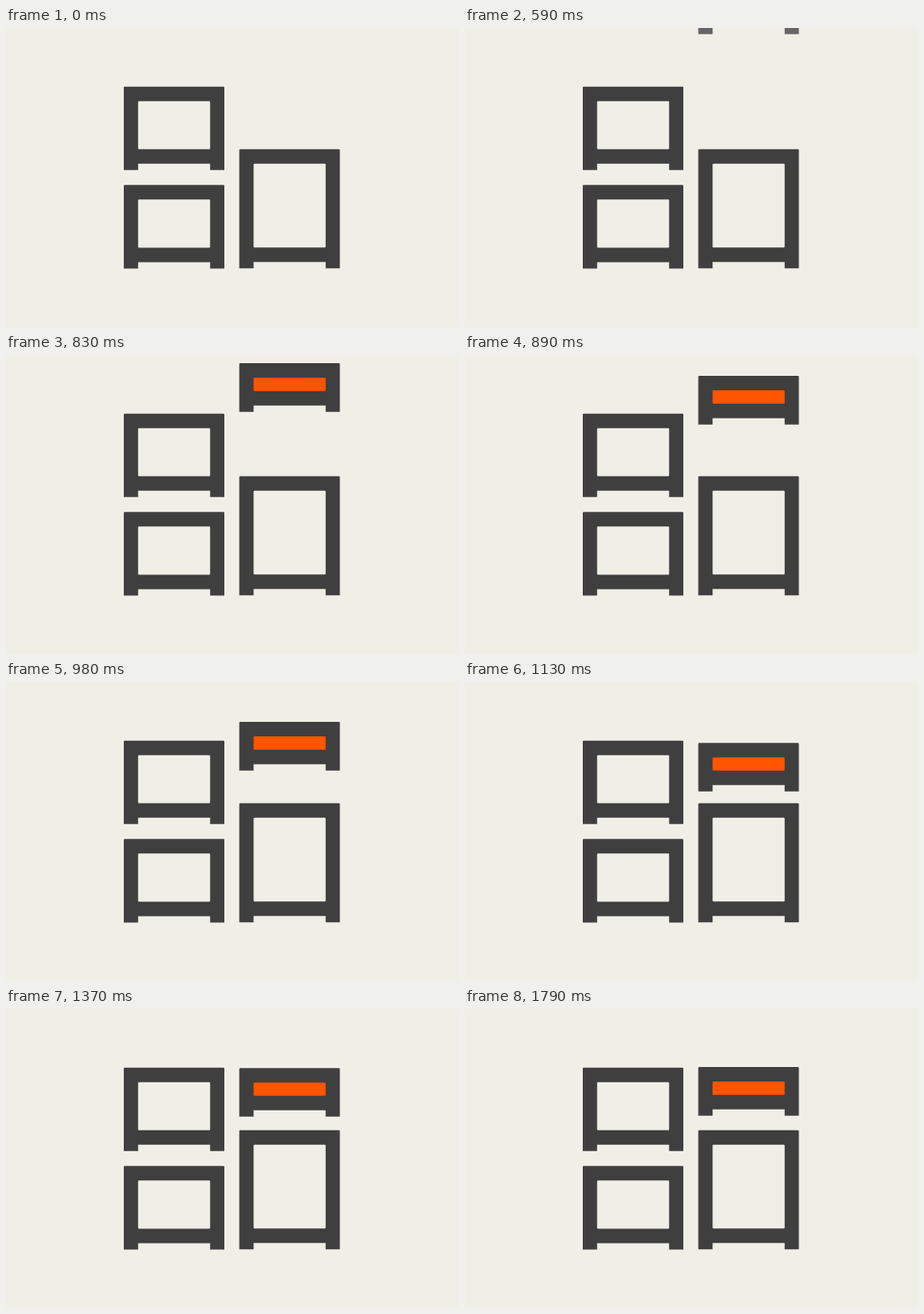
Animation of 500 by 330 pixels, one loop 2150 ms. Source, as an HTML page:

```html
<!DOCTYPE html>
<html lang="en">
<head>
<meta charset="utf-8">
<title>Falling block</title>
<style>
  html, body { margin: 0; width: 100%; height: 100%; overflow: hidden; background: #f0efe7; }
  svg { display: block; width: 100vw; height: 100vh; }
</style>
</head>
<body>
<svg id="stage" viewBox="0 0 500 330"></svg>
<script>
const LOOP = 2150, ENTER = 590, BRAKE = 980, LAND = 1090, HOLD = 1370, SETTLE = 1790;
const STEP = 30, REST = 64.1, SPEED = 0.2333;
const SWING = 4, PERIOD = 260, DECAY = 0.002;
const LAND_SPEED = SWING * 2 * Math.PI / PERIOD;
const stage = document.getElementById('stage');

function add(parent, tag, attrs) {
  const el = document.createElementNS('http://www.w3.org/2000/svg', tag);
  for (const key in attrs) el.setAttribute(key, attrs[key]);
  parent.appendChild(el);
  return el;
}

// A thick frame with a window of the given height, standing on two short legs.
function addBlock(x, y, hole, fill) {
  const g = add(stage, 'g', { transform: `translate(${x} ${y})` });
  if (fill) add(g, 'rect', { x: 15, y: 15, width: 81, height: hole + 2, fill });
  const bottom = hole + 32, foot = hole + 39;
  add(g, 'path', {
    fill: '#3f3f3f',
    'fill-rule': 'evenodd',
    d: `M0 1Q0 0 1 0H110Q111 0 111 1V${foot}H95.3V${bottom}H15.8V${foot}H0Z` +
       `M16.8 16Q15.8 16 15.8 17V${hole + 15}Q15.8 ${hole + 16} 16.8 ${hole + 16}` +
       `H94.3Q95.3 ${hole + 16} 95.3 ${hole + 15}V17Q95.3 16 94.3 16Z`
  });
  return g;
}

addBlock(130, 64.8, 53);
addBlock(130, 173.2, 53.3);
addBlock(257.5, 133.8, 92.5);
const faller = addBlock(257.5, -60, 14.7, '#ff5500');

function hermite(u, span, a, va, b, vb) {
  const u2 = u * u, u3 = u2 * u;
  return a * (2 * u3 - 3 * u2 + 1) + va * span * (u3 - 2 * u2 + u) +
         b * (3 * u2 - 2 * u3) + vb * span * (u3 - u2);
}

// Steady drop, braking near the end, then a damped bounce.
function topAt(t) {
  const brakeY = -47 + SPEED * (BRAKE - ENTER);
  if (t < BRAKE) return -47 + SPEED * (t - ENTER);
  if (t < LAND) {
    const span = LAND - BRAKE;
    return hermite((t - BRAKE) / span, span, brakeY, SPEED, REST, LAND_SPEED);
  }
  const s = t - LAND;
  return REST + SWING * Math.exp(-DECAY * s) * Math.sin(2 * Math.PI * s / PERIOD);
}

function draw(t) {
  faller.style.display = t < ENTER ? 'none' : '';
  if (t < ENTER) return;
  const tick = Math.min(HOLD, ENTER + STEP * Math.floor((t - ENTER) / STEP));
  const y = t < SETTLE ? topAt(tick) : REST;
  faller.setAttribute('transform', `translate(257.5 ${y.toFixed(2)})`);
  faller.setAttribute('opacity', Math.min(1, 0.78 + (tick - ENTER) * 0.0037));
}

function loop() {
  draw(performance.now() % LOOP);
  requestAnimationFrame(loop);
}
loop();
</script>
</body>
</html>
```
